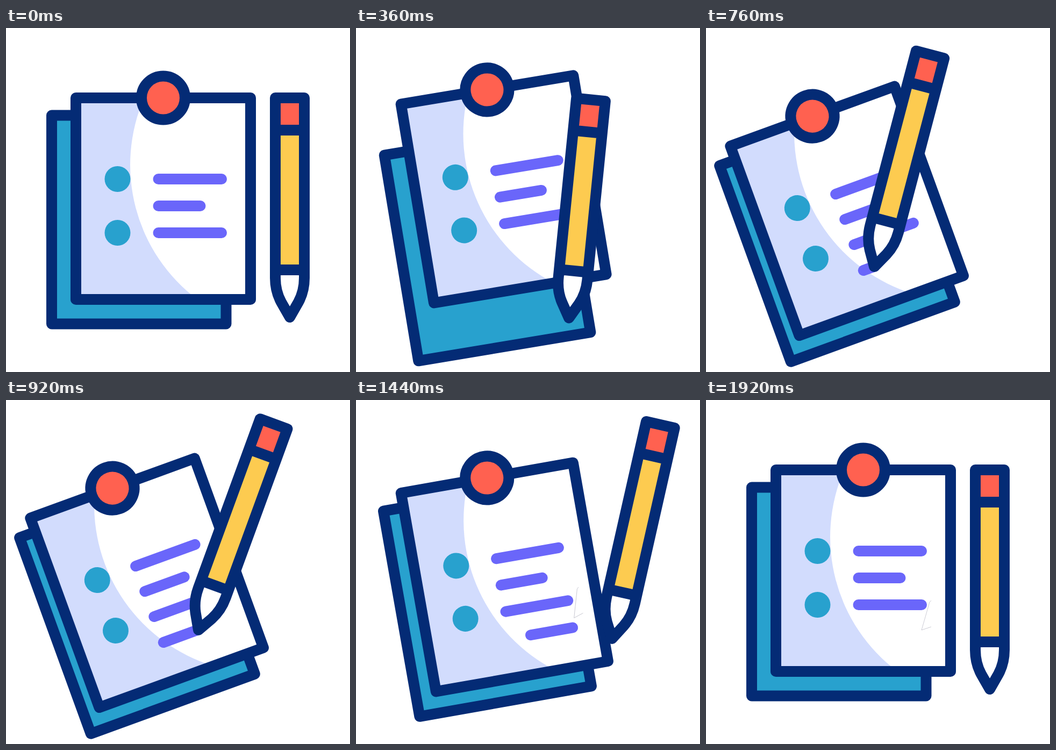
Animation, 640 px wide and 640 px high, one loop 2000 ms. Source, as an HTML page:

```html
<!DOCTYPE html>
<html lang="en">
<head>
<meta charset="utf-8">
<title>Notepad and pencil</title>
<style>
html, body { margin: 0; height: 100%; overflow: hidden; background: #fff; }
svg { display: block; width: 100%; height: 100%; }
.ink { stroke: #042b75; stroke-width: 20; stroke-linejoin: round; }
.bar { stroke: #6a66fa; stroke-width: 20; stroke-linecap: round; }
</style>
</head>
<body>
<svg viewBox="0 0 640 640">
  <g id="back">
    <rect class="ink" x="85" y="162.5" width="324.5" height="388" fill="#28a1ce"/>
  </g>
  <g id="paper">
    <rect x="130" y="130" width="325" height="375" fill="#fff"/>
    <path d="M130 130H257A313 313 0 0 0 356 505H130z" fill="#d2dcfd"/>
    <rect class="ink" x="130" y="130" width="325" height="375" fill="none"/>
    <g fill="#28a1ce">
      <circle cx="207.5" cy="281" r="24"/>
      <circle cx="207.5" cy="381" r="24"/>
    </g>
    <path class="bar" d="M283.5 281H401M283.5 331H361.5M283.5 381H401"/>
    <path class="bar" id="written"/>
    <path id="hair" d="M419 373l-3 3-15 52 18-6" fill="none" stroke="#99a" stroke-width=".5"/>
    <circle class="ink" cx="292.5" cy="130" r="40.5" fill="#ff6150"/>
  </g>
  <g id="pencil">
    <path d="M501 130H555V465C555 485 550 499 544 510L528 538 512 510C506 499 501 485 501 465z" fill="#fff"/>
    <path d="M501 130h54v60h-54z" fill="#ff6150"/>
    <path d="M501 190h54v260h-54z" fill="#fdcb50"/>
    <path class="ink" d="M501 130H555V465C555 485 550 499 544 510L528 538 512 510C506 499 501 485 501 465zM501 190H555M501 450H555" fill="none"/>
  </g>
</svg>
<script>
const LOOP = 2000, STEP = 40;
const el = id => document.getElementById(id);
const back = el('back'), paper = el('paper'), pencil = el('pencil');
const written = el('written'), hair = el('hair');

const span = (t, a, b) => Math.min(1, Math.max(0, (t - a) / (b - a)));
const smooth = u => u * u * (3 - 2 * u);
const ease = (t, a, b) => smooth(span(t, a, b));
const mix = (a, b, u) => a + (b - a) * u;
const place = (node, value) => node.setAttribute('transform', value);

function draw(t) {
  const tilt = ease(t, 138, 600);
  const glide = ease(t, 80, 600);
  const write = ease(t, 600, 1170);
  const erase = ease(t, 1200, 1830);
  const home = span(t, 1200, 1920);
  const settle = Math.sin(home * Math.PI / 2);

  // the two sheets part and close again while they tilt
  const part = ease(t, 120, 360) - ease(t, 360, 600);
  const angle = -20 * (tilt - settle);
  const drift = 8 * settle * (1 - settle);
  place(back, `translate(0 ${32.6 * part}) rotate(${angle} 320.6 379)`);
  place(paper, `translate(${-2.6 * part} ${drift - 27 * part}) rotate(${angle} 342 415)`);

  // the line grows to the right, then vanishes from its left end
  const x = u => mix(283.5, 401, u);
  written.setAttribute('d', write > 0 && erase < 1 ? `M${x(erase)} 432H${x(write)}` : '');
  hair.style.display = settle > .3 ? '' : 'none';
  place(hair, `translate(${-.57 * angle} ${1.33 * angle})`);

  // pencil tip: swing in, write, swing home
  let tipX = mix(528, 291.5, glide);
  let tipY = mix(538, 452, glide) + 200 * glide * (1 - glide);
  tipX = mix(tipX, 404, write);
  tipY = mix(tipY, 411, write);
  tipX = mix(tipX, 528, smooth(1 - (1 - home) ** 2));
  tipY = mix(tipY, 538, smooth(home));
  const lean = (12.2 * tilt + 13.3 * write) * (1 - settle);
  place(pencil, `translate(${tipX} ${tipY}) rotate(${lean}) translate(-528 -538)`);
}

const start = performance.now();
function tick() {
  const t = (performance.now() - start) % LOOP;
  draw(Math.floor(t / STEP) * STEP);
  requestAnimationFrame(tick);
}
tick();
</script>
</body>
</html>
```
